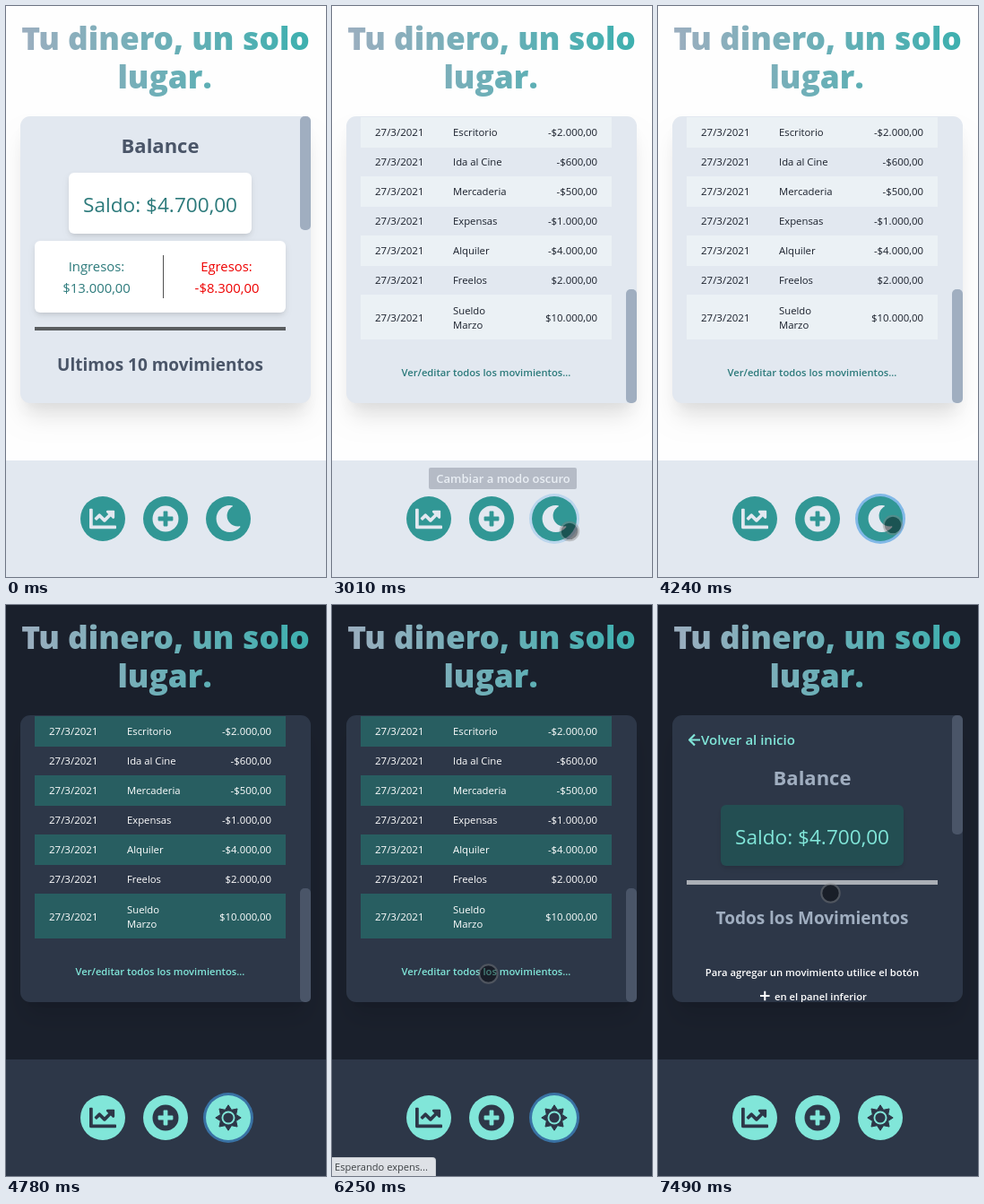
An HTML page with a canvas for the animation above (8 s loop, 357x637 px).

```html
<!DOCTYPE html>
<html lang="es">
<head>
<meta charset="utf-8">
<title>Tu dinero, un solo lugar.</title>
<style>
html, body { margin: 0; width: 100%; height: 100%; overflow: hidden; }
canvas { display: block; width: 357px; height: 637px; }
</style>
</head>
<body>
<canvas id="stage"></canvas>
<script>
const W = 357, H = 637, LOOP = 8000;
const canvas = document.getElementById('stage');
const ctx = canvas.getContext('2d');
const dpr = window.devicePixelRatio || 1;
canvas.width = W * dpr;
canvas.height = H * dpr;

const CARD = { x: 16, y: 123, w: 324, h: 320 };

// each colour: light theme, dark theme
const COLORS = {
  page: ['#fefefe', '#1a202c'],
  panel: ['#e2e8f0', '#2d3748'],
  heading: ['#4a5568', '#a0aec0'],
  box: ['#ffffff', '#234e52'],
  income: ['#2c7a7b', '#81e6d9'],
  expense: ['#ee0000', '#feb2b2'],
  rule: ['#5a5d60', '#abafb6'],
  split: ['#505050', '#a7b8ba'],
  note: ['#4a5568', '#ffffff'],
  cell: ['#1a202c', '#ffffff'],
  stripe: ['#ebf1f5', '#285e61'],
  thumb: ['#a0aec0', '#4a5568'],
  button: ['#319795', '#81e6d9']
};

const ROWS = [
  ['29/3/2021', 'Honorarios', '$1.000,00'],
  ['27/3/2021', 'Comida Mascota', '-$200,00'],
  ['27/3/2021', 'Escritorio', '-$2.000,00'],
  ['27/3/2021', 'Ida al Cine', '-$600,00'],
  ['27/3/2021', 'Mercaderia', '-$500,00'],
  ['27/3/2021', 'Expensas', '-$1.000,00'],
  ['27/3/2021', 'Alquiler', '-$4.000,00'],
  ['27/3/2021', 'Freelos', '$2.000,00'],
  ['27/3/2021', 'Sueldo Marzo', '$10.000,00']
];

// icons on a 512 unit grid
const MOON = new Path2D('M283 512c79 0 151-36 199-95 7-9-1-21-12-19-124 23-238-72-238-197 0-72 39-139 102-175 9-5 7-20-4-22A258 258 0 0 0 283 0c-141 0-256 115-256 256 0 141 115 256 256 256z');
const CHART = new Path2D('M496 384H64V80q0-16-16-16H16Q0 64 0 80v336q0 32 32 32h464q16 0 16-16v-32q0-16-16-16z' +
  'M464 96H346c-21 0-32 26-17 41l32 32-73 74-73-74q-23-19-46 0l-68 69q-10 11 0 23l22 22q12 10 23 0l46-46 73 74q23 18 46 0l96-96 32 32c15 15 41 4 41-17V112q0-16-16-16z');

const rgb = hex => [1, 3, 5].map(i => parseInt(hex.slice(i, i + 2), 16));
const lerp = (a, b, p) => a + (b - a) * p;
const linear = p => p;
const easeOut = p => 1 - (1 - p) * (1 - p);

function mix(a, b, p) {
  const to = rgb(b);
  return `rgb(${rgb(a).map((v, i) => Math.round(lerp(v, to[i], p)))})`;
}

// progress 0..1 in n equal jumps, the first at t0 and the last at t1
function run(t, t0, t1, n, ease = linear) {
  if (t < t0) return 0;
  const k = Math.floor((t - t0) / (t1 - t0) * (n - 1) + 1e-6) + 1;
  return ease(Math.min(k / n, 1));
}

function rect(x, y, w, h, r, fill) {
  ctx.beginPath();
  ctx.roundRect(x, y, w, h, r);
  ctx.fillStyle = fill;
  ctx.fill();
}

function disc(x, y, r, fill) {
  ctx.beginPath();
  ctx.arc(x, y, r, 0, Math.PI * 2);
  ctx.fillStyle = fill;
  ctx.fill();
}

function line(points, width, color) {
  ctx.beginPath();
  points.forEach(p => ctx.lineTo(p[0], p[1]));
  ctx.lineWidth = width;
  ctx.strokeStyle = color;
  ctx.stroke();
}

function icon(path, x, y, color) {
  ctx.save();
  ctx.translate(x - 15, y - 15);
  ctx.scale(30 / 512, 30 / 512);
  ctx.fillStyle = color;
  ctx.fill(path);
  ctx.restore();
}

function text(str, x, y, size, weight, fill, align = 'center') {
  ctx.font = `${weight} ${size}px "Open Sans", "Noto Sans", sans-serif`;
  ctx.textAlign = align;
  ctx.fillStyle = fill;
  ctx.fillText(str, x, y);
}

function shadowRect(x, y, w, h, r, fill, layers) {
  for (const [dy, blur, inset, alpha] of layers) {
    ctx.save();
    ctx.shadowColor = `rgba(0,0,0,${alpha})`;
    ctx.shadowBlur = blur * dpr;
    ctx.shadowOffsetY = dy * dpr;
    rect(x + inset, y + inset, w - 2 * inset, h - 2 * inset, r, fill);
    ctx.restore();
  }
  rect(x, y, w, h, r, fill);
}

const box = (x, y, w, h, c) =>
  shadowRect(x, y, w, h, 6, c.box, [[4, 6, 1, 0.1], [2, 4, 1, 0.06]]);

function balance(y, c) {
  text('Balance', 172, y + 164, 22, 700, c.heading);
  box(70, y + 186, 204, 68, c);
  text('Saldo: $4.700,00', 172, y + 230, 22.6, 400, c.income);
}

function table(y, c) {
  text('Para agregar un movimiento utilice el botón', 172, y + 462, 11.25, 600, c.note);
  rect(114, y + 483, 10.5, 2, 0, c.note);
  rect(118.25, y + 478.75, 2, 10.5, 0, c.note);
  text('en el panel inferior', 130, y + 489, 11.25, 600, c.note, 'left');

  ctx.letterSpacing = '0.6px';
  text('FECHA', 48, y + 521, 11.6, 700, c.heading, 'left');
  text('DETALLE', 135, y + 521, 11.6, 700, c.heading, 'left');
  text('MONTO', 296.6, y + 521, 11.6, 700, c.heading, 'right');
  ctx.letterSpacing = '0px';

  let top = y + 528;
  ROWS.forEach(([date, detail, amount], i) => {
    const lines = /^(Comida|Sueldo)/.test(detail) ? detail.split(' ') : [detail];
    const h = 17 + 16 * lines.length;
    const base = top + (lines.length > 1 ? 30 : 21);
    if (i % 2 === 0) rect(32, top, 280, h + 1, 0, c.stripe);
    text(date, 48, base, 11.5, 400, c.cell, 'left');
    lines.forEach((word, n) =>
      text(word, 135, base + 16 * n - 8 * (lines.length - 1), 11.3, 400, c.cell, 'left'));
    text(amount, 296, base, 11.4, 400, c.cell, 'right');
    top += h;
  });
}

function homePage(y, c, dark) {
  balance(y, c);
  box(32, y + 262, 280, 80, c);
  text('Ingresos:', 101, y + 296, 14.85, 400, c.income);
  text('$13.000,00', 101, y + 320, 14.85, 400, c.income);
  text('Egresos:', 246, y + 296, 14.85, 400, c.expense);
  text('-$8.300,00', 246.5, y + 320, 14.85, 400, c.expense);
  const split = dark > 0.5 ? 2 : 1;
  rect(176 - split, y + 278, split, 48, 0, c.split);
  rect(32, y + 358, 280, dark > 0.5 ? 5 : 4, 0, c.rule);
  text('Ultimos 10 movimientos', 172, y + 407, 19, 700, c.heading);
  table(y, c);
  text('Ver/editar todos los movimientos...', 172, y + 899, 11.2, 600, c.income);
}

function listPage(y, c) {
  line([[41, y + 144.5], [35, y + 150.5], [41, y + 156.5]], 2.2, c.income);
  line([[35, y + 150.5], [47, y + 150.5]], 2.2, c.income);
  text('Volver al inicio', 48, y + 156, 15, 600, c.income, 'left');
  balance(y + 37, c);
  rect(32, y + 307, 280, 5, 0, c.rule);
  text('Todos los Movimientos', 172, y + 356, 19, 700, c.heading);
  table(y - 48, c);
}

function sun(x, y, color, gap) {
  ctx.beginPath();
  for (let i = 0; i < 16; i++) {
    const r = i % 2 ? 9.4 : 14.2, a = i * Math.PI / 8;
    ctx.lineTo(x + r * Math.cos(a), y + r * Math.sin(a));
  }
  ctx.closePath();
  ctx.lineWidth = 1;
  ctx.fillStyle = ctx.strokeStyle = color;
  ctx.fill();
  ctx.stroke();
  disc(x, y, 7.5, gap);
  disc(x, y, 5.6, color);
}

function footer(c, isDark, ring) {
  rect(0, 507, W, 130, 0, c.panel);
  if (ring) disc(248, 572, 28, `rgba(66,153,225,${0.6 * ring})`);
  for (const x of [108, 178, 248]) disc(x, 572, 25, c.button);

  ctx.lineJoin = 'round';
  icon(CHART, 108, 572, c.panel);
  disc(178, 572, 14.5, c.panel);
  rect(169.6, 569.6, 16.8, 4.8, 0.8, c.button);
  rect(175.6, 563.6, 4.8, 16.8, 0.8, c.button);
  if (isDark) sun(248, 572, c.panel, c.button);
  else icon(MOON, 248, 572, c.panel);
}

function tooltip(alpha) {
  rect(108, 515, 165, 24, 2, `rgba(45,55,72,${alpha})`);
  text('Cambiar a modo oscuro', 191, 532, 13, 600, mix('#e2e8f0', '#ffffff', alpha));
}

function statusBar() {
  rect(-1, 616, 117, 22, [0, 4, 0, 0], '#c8ccd2');
  rect(-1, 617, 116, 21, [0, 3, 0, 0], '#dee1e6');
  text('Esperando expens...', 3, 631, 11.1, 400, '#3c4043', 'left');
}

function cursor([x, y]) {
  disc(x, y, 9.3, 'rgba(0,0,0,.44)');
  ctx.beginPath();
  ctx.arc(x, y, 10.2, 0, Math.PI * 2);
  ctx.lineWidth = 2;
  ctx.strokeStyle = 'rgba(128,128,128,.42)';
  ctx.stroke();
}

function cursorAt(t) {
  if (t >= 1320 && t < 2550) return [223.5, 338.5];
  if (t >= 3010 && t < 4705) {
    const p = run(t, 3090, 4240, 15);
    return [lerp(265, 262, p), lerp(586, 579, p)];
  }
  if (t >= 6250) {
    const p = run(t, 6485, 6720, 4);
    return [lerp(174.5, 192.5, p), lerp(411.5, 321.5, p)];
  }
  return null;
}

function draw(t) {
  const dark = run(t, 3090, 3245, 3) - run(t, 3860, 4015, 3) + run(t, 4550, 4705, 3);
  const isDark = (t >= 3090 && t < 3860) || t >= 4550;
  const onList = t >= 6485;
  const range = onList ? 450 : 486;
  const scroll = onList
    ? range * (1 - run(t, 6950, 7490, 8))
    : 34 * run(t, 850, 1010, 3) + 263 * run(t, 1320, 1550, 4) +
      189 * run(t, 1860, 2320, 7, easeOut) -
      486 * run(t, 4783, 5170, 6) + 486 * run(t, 5320, 5470, 3);
  const c = {};
  for (const key in COLORS) c[key] = mix(...COLORS[key], dark);

  ctx.setTransform(dpr, 0, 0, dpr, 0, 0);
  rect(0, 0, W, H, 0, c.page);

  const ink = ctx.createLinearGradient(0, 0, W, 0);
  ink.addColorStop(0, '#a0aec0');
  ink.addColorStop(1, '#38b0ae');
  text('Tu dinero, un solo', 178, 49, 35.3, 800, ink);
  text('lugar.', 177, 92, 35.3, 800, ink);

  const { x, y, w, h } = CARD;
  shadowRect(x, y, w, h, 11, c.panel, [[20, 25, 5, 0.1], [10, 10, 5, 0.04]]);
  ctx.save();
  ctx.beginPath();
  ctx.roundRect(x, y, w, h, 11);
  ctx.clip();
  const top = -Math.round(scroll);
  if (onList) listPage(top, c);
  else homePage(top, c, dark);
  ctx.restore();

  const size = onList ? 133 : 127;
  rect(328, y + (h - size) * scroll / range, 12, size, 5, c.thumb);

  const ring = t < 3010 || t >= 6485 ? 0 : t < 3090 ? 0.4 : 1;
  footer(c, isDark, ring);
  if (t >= 3010 && t < 3090) tooltip(0.25);
  if (t >= 6250 && t < 6640) statusBar();
  const spot = cursorAt(t);
  if (spot) cursor(spot);
}

function frame() {
  draw(performance.now() % LOOP);
  requestAnimationFrame(frame);
}
frame();
</script>
</body>
</html>
```
